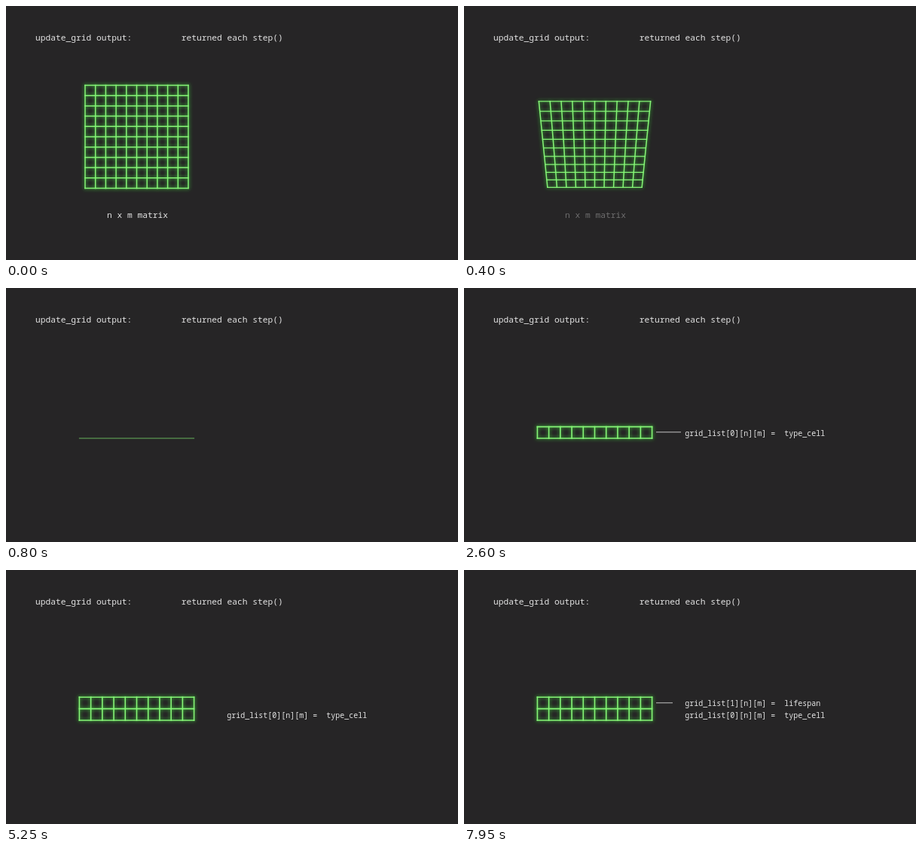
These frames come from a looping animation (600 px wide and 338 px high, 8000 ms). An HTML page:

```html
<!DOCTYPE html>
<html lang="en">
<head>
<meta charset="utf-8">
<title>Grid output</title>
<style>
  html, body { margin: 0; width: 100%; height: 100%; overflow: hidden; background: #262526; }
  svg { display: block; width: 100vw; height: 100vh; }
  text { font: 11.25px "Noto Sans Mono", "DejaVu Sans Mono", monospace; fill: #e4e4e4; white-space: pre; }
  .small { font-size: 10px; }
  .link { stroke: #c4c4c4; stroke-width: 1; }
  .grid path { fill: none; stroke: #86f577; stroke-linecap: square; }
  .glow path { stroke: #3fe03a; }
</style>
</head>
<body>
<svg viewBox="0 0 600 338">
  <defs>
    <filter id="blur" filterUnits="userSpaceOnUse" x="70" y="80" width="210" height="190">
      <feGaussianBlur stdDeviation="2.6"/>
    </filter>
  </defs>
  <text x="39" y="46">update_grid output:</text>
  <text x="232.8" y="46">returned each step()</text>
  <text id="caption" x="134" y="282">n x m matrix</text>
  <g id="glow" class="grid glow" filter="url(#blur)"></g>
  <g id="lines" class="grid"></g>
  <line id="link0" class="link" x1="255" y1="191.8" y2="191.8"/>
  <line id="link1" class="link" x1="255" y1="176.8" y2="176.8"/>
  <text id="label0" class="small" x="293.3" y="196.5">grid_list[0][n][m] =  type_cell</text>
  <text id="label1" class="small" x="293.3" y="181">grid_list[1][n][m] =  lifespan</text>
</svg>
<script>
const LOOP = 8000, STEP = 50, CELLS = 10;
const CX = 173.5, HORIZON = 200, HALF = 68.5, DEPTH = 0.148;
const ROW_LEFT = 97.4, ROW_WIDTH = 152.2, ROW_HEIGHT = 15.4;

const $ = id => document.getElementById(id);
const ramp = (t, from, to) => Math.min(1, Math.max(0, (t - from) / (to - from)));
const easeOut = p => 1 - (1 - p) * (1 - p);
const segment = (x1, y1, x2, y2, width) =>
  `<path d="M${x1.toFixed(2)} ${y1.toFixed(2)}L${x2.toFixed(2)} ${y2.toFixed(2)}" stroke-width="${width.toFixed(2)}"/>`;

// Square grid tilting back until it is seen edge-on.
function tiltedGrid(p) {
  const angle = p * Math.PI / 2, sin = Math.sin(angle), cos = Math.cos(angle);
  const size = 1 - 0.0485 * (1 - cos), offset = -26 * (1 - sin);
  const project = (u, v) => {
    const scale = size / (1 + v * DEPTH * sin);
    return [CX + u * HALF * scale, HORIZON + (offset + v * HALF * cos) * scale];
  };
  let out = "";
  for (let i = 0; i <= CELLS; i++) {
    const k = i / CELLS * 2 - 1;
    out += segment(...project(-1, k), ...project(1, k), Math.max(0.8, 1.5 * cos));
    out += segment(...project(k, -1), ...project(k, 1), 1.5);
  }
  return out;
}

// Rows of cells rising from the ground line, each with its own growth.
function stackedRows(grown) {
  const right = ROW_LEFT + ROW_WIDTH;
  const height = ROW_HEIGHT * (grown[0] + grown[1]);
  let out = segment(ROW_LEFT, HORIZON, right, HORIZON, 1 + 0.6 * grown[0]);
  let y = HORIZON;
  for (const g of grown) {
    if (!g) continue;
    y -= ROW_HEIGHT * g;
    out += segment(ROW_LEFT, y, right, y, 1.6);
  }
  if (height) {
    for (let i = 0; i <= CELLS; i++) {
      const x = ROW_LEFT + ROW_WIDTH * i / CELLS;
      out += segment(x, HORIZON, x, HORIZON - height, 1.6);
    }
  }
  return out;
}

function setLink(id, length) {
  $(id).setAttribute("x2", 255 + 33 * length);
  $(id).style.display = length > 0 ? "" : "none";
}

function draw(t) {
  const tilt = ramp(t, 150, 800);
  const grown = [easeOut(ramp(t, 2050, 2300)), easeOut(ramp(t, 4950, 5250))];
  const edgeOn = tilt === 1;
  const shapes = edgeOn ? stackedRows(grown) : tiltedGrid(tilt);

  $("lines").innerHTML = shapes;
  $("lines").setAttribute("opacity", edgeOn ? 0.68 + 0.32 * grown[0] : 1);
  $("glow").innerHTML = shapes;
  $("glow").setAttribute("opacity", edgeOn ? grown[0] : Math.sqrt(Math.cos(tilt * Math.PI / 2)));

  $("caption").setAttribute("opacity", 1 - ramp(t, 150, 550));
  setLink("link0", ramp(t, 2300, 2450) - ramp(t, 4850, 5000));
  setLink("link1", ramp(t, 5250, 5400) - ramp(t, 7900, 8050));
  $("label0").setAttribute("opacity", ramp(t, 2350, 2600));
  $("label1").setAttribute("opacity", ramp(t, 5400, 5700));
}

const start = performance.now();
function tick() {
  const t = (performance.now() - start) % LOOP;
  draw(Math.floor(t / STEP) * STEP);
  requestAnimationFrame(tick);
}
tick();
</script>
</body>
</html>
```
